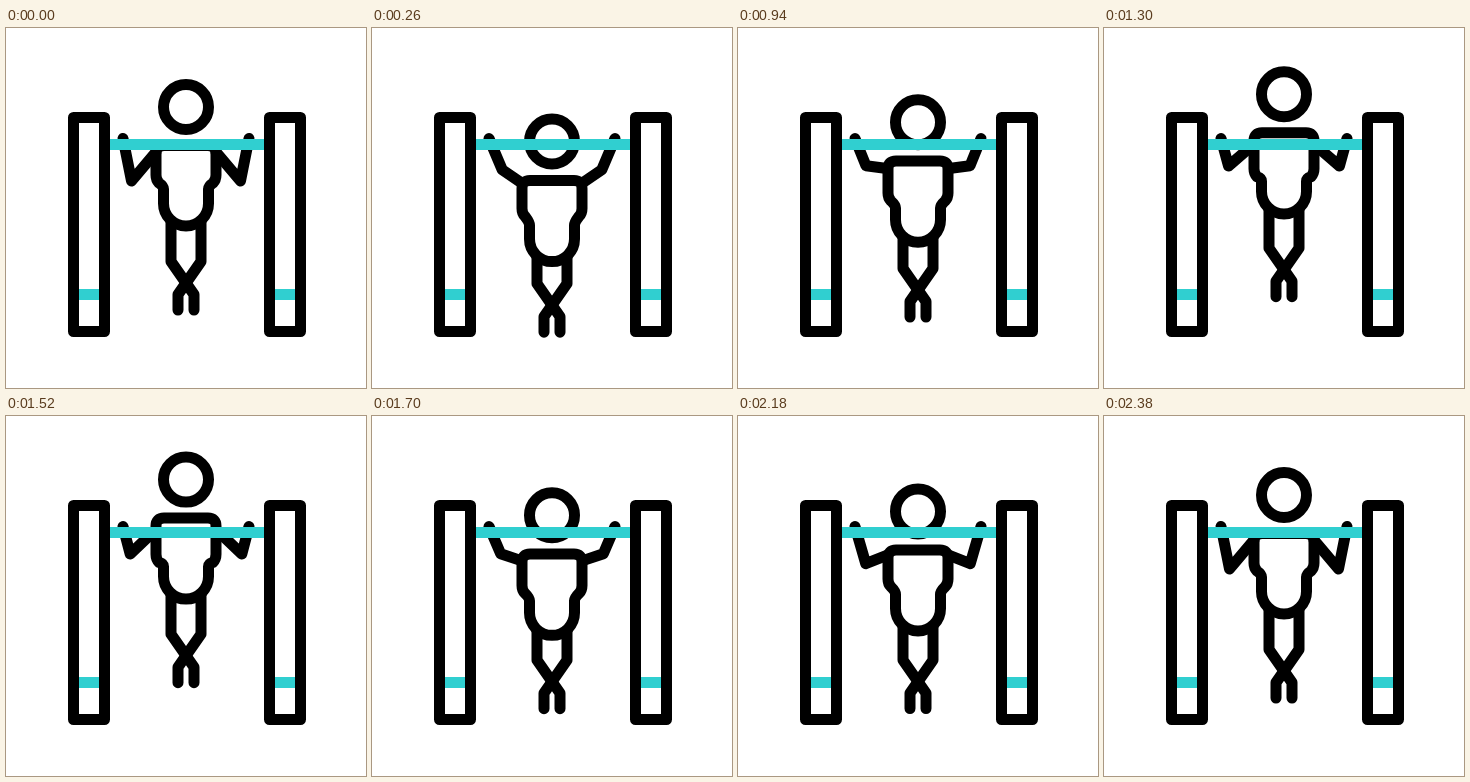
Write an HTML page with a canvas that moves like this. It is 360 px wide and 360 px high and loops after 2400 ms.

```html
<!DOCTYPE html>
<html lang="en">
<head>
<meta charset="utf-8">
<title>Pull-ups</title>
<style>
  html, body { margin: 0; width: 100%; height: 100%; overflow: hidden; background: #fff; }
  canvas { display: block; width: 100vmin; height: 100vmin; }
</style>
</head>
<body>
<canvas id="stage" width="360" height="360"></canvas>
<script>
const ctx = document.getElementById('stage').getContext('2d');
const LOOP = 2400, STEP = 20, CENTER = 180;
const BLACK = '#000', TEAL = '#30cfd0';

// Vertical positions of the body parts, plus the elbow and shoulder ends of the left arm.
const START = { head: 79, top: 117.5, chest: 152, waist: 161, hip: 198, knee: 233.5,
                elbowX: 125.5, elbowY: 153, armX: 150, armY: 124 };
const LOW = { head: 126.5, top: 165.5, chest: 198, waist: 211, hip: 247, knee: 264,
              elbowX: 132, elbowY: 137.5, armX: 150, armY: 167 };
const HIGH = { head: 62, top: 100.5, chest: 142, waist: 149, hip: 181.5, knee: 217,
               elbowX: 124, elbowY: 138, armX: 148, armY: 114 };
const KEYS = [[0, START], [400, LOW], [1480, HIGH], [1880, LOW], [2380, START], [LOOP, START]];

function poseAt(time) {
  const next = KEYS.findIndex(([at]) => at > time);
  const [t0, from] = KEYS[next - 1], [t1, to] = KEYS[next];
  const ease = (1 - Math.cos(Math.PI * (time - t0) / (t1 - t0))) / 2;
  const pose = {};
  for (const part in from) pose[part] = from[part] + (to[part] - from[part]) * ease;
  return pose;
}

function line(...points) {
  ctx.beginPath();
  points.forEach(([x, y]) => ctx.lineTo(x, y));
  ctx.stroke();
}

function bothSides(draw) {
  draw(x => x);
  draw(x => 2 * CENTER - x);
}

function drawLegs({ hip, knee }) {
  bothSides(m => line([m(165), hip - 12], [m(165), knee], [m(188), knee + 33], [m(188), knee + 48.5]));
}

function drawTorso({ top, chest, waist, hip }) {
  const r = 22.5, left = 150, right = 210;
  ctx.beginPath();
  ctx.moveTo(CENTER, top);
  ctx.lineTo(right - 8, top);
  ctx.quadraticCurveTo(right, top, right, top + 8);
  ctx.lineTo(right, chest - 5);
  ctx.quadraticCurveTo(right, chest, right - 3, chest + 3);
  ctx.quadraticCurveTo(CENTER + r, waist - 3, CENTER + r, waist);
  ctx.arc(CENTER, hip - r, r, 0, Math.PI);
  ctx.lineTo(CENTER - r, waist);
  ctx.quadraticCurveTo(CENTER - r, waist - 3, left + 3, chest + 3);
  ctx.quadraticCurveTo(left, chest, left, chest - 5);
  ctx.lineTo(left, top + 8);
  ctx.quadraticCurveTo(left, top, left + 8, top);
  ctx.closePath();
  ctx.fillStyle = '#fff';
  ctx.fill();
  ctx.stroke();
}

function drawArms({ elbowX, elbowY, armX, armY }) {
  bothSides(m => line([m(117), 110.5], [m(elbowX), elbowY], [m(armX), armY]));
}

function drawHead({ head }) {
  ctx.beginPath();
  ctx.arc(CENTER, head, 22.5, 0, 2 * Math.PI);
  ctx.stroke();
}

function drawFrame() {
  ctx.fillStyle = TEAL;
  ctx.fillRect(100, 111, 162, 11);
  for (const x of [67.5, 263.5]) {
    ctx.fillRect(x, 261, 31, 11);
    ctx.strokeRect(x, 89.5, 31, 214);
  }
}

function render(time) {
  const pose = poseAt(time);
  ctx.fillStyle = '#fff';
  ctx.fillRect(0, 0, 360, 360);
  ctx.strokeStyle = BLACK;
  ctx.lineWidth = 11;
  ctx.lineCap = ctx.lineJoin = 'round';
  drawLegs(pose);
  drawTorso(pose);
  drawArms(pose);
  drawHead(pose);
  drawFrame();
}

const began = performance.now();
function tick() {
  const time = (performance.now() - began) % LOOP;
  render(Math.floor(time / STEP) * STEP);
  requestAnimationFrame(tick);
}
tick();
</script>
</body>
</html>
```
